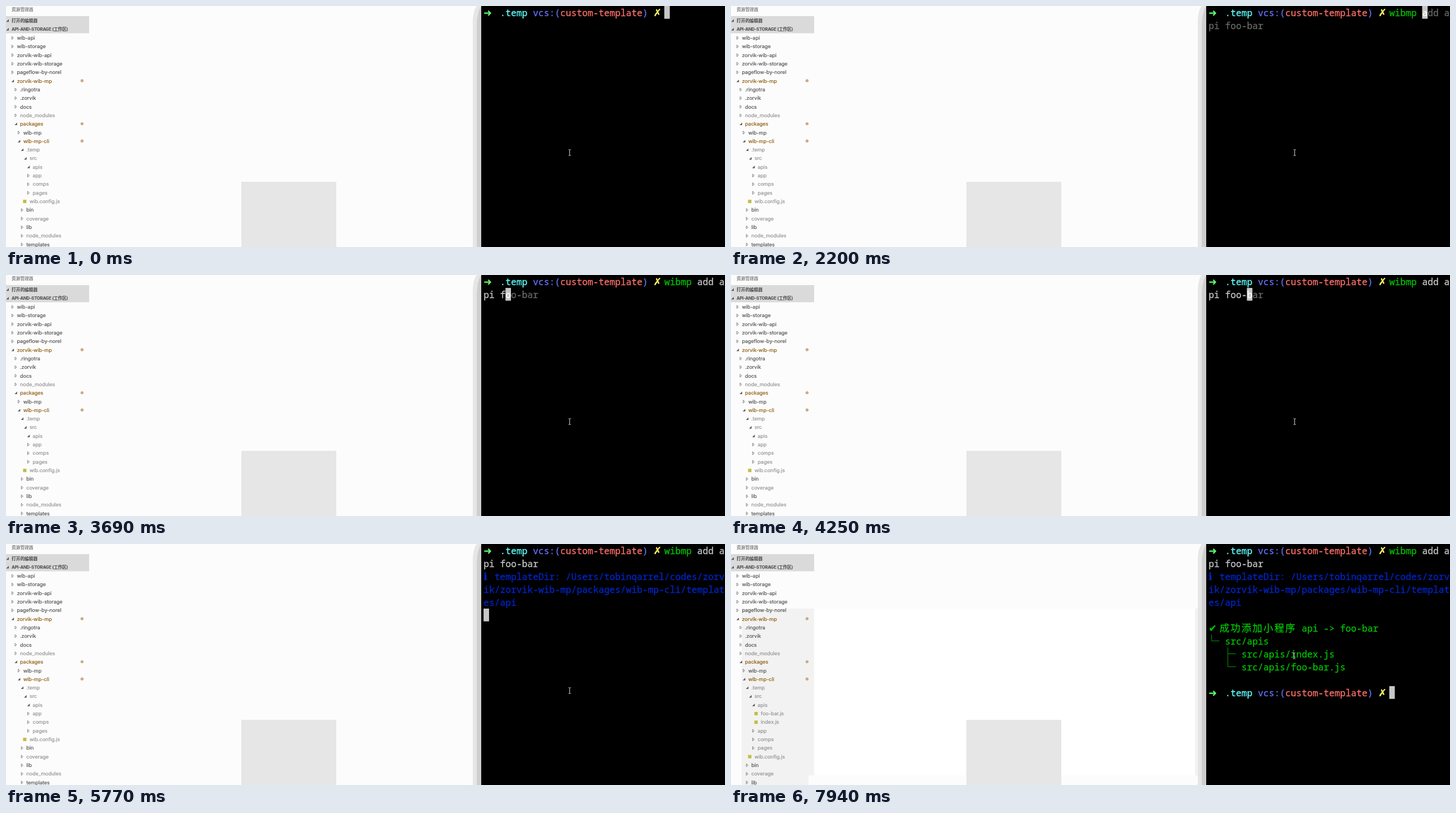
Animation of 1280x429 px, one loop 8000 ms. Source, as an HTML page:

```html
<!DOCTYPE html>
<html lang="zh-CN">
<head>
<meta charset="utf-8">
<title>Terminal demo</title>
<style>
  html, body { margin: 0; width: 100%; height: 100%; overflow: hidden; background: #fcfcfc; }
  svg { display: block; width: 100vw; height: 100vh; }
  text { white-space: pre; fill: currentColor; stroke: currentColor; stroke-width: .15; }
  .side { font: 9px Inter, "Noto Sans CJK SC", "Noto Sans CJK", sans-serif; }
  .head { font: 7.7px Inter, "Noto Sans CJK SC", "Noto Sans CJK", sans-serif; }
  .bold { font-weight: 700; }
  .tight { letter-spacing: -.2px; }
  .mono { font: 16.25px "Noto Sans Mono", monospace; }
  .mono text { stroke-width: .3; }
  .sym { font: 17.5px "DejaVu Sans", sans-serif; }
  .cjk { font: 17.5px "Noto Sans CJK SC", "Noto Sans CJK", sans-serif; letter-spacing: 2px; }
</style>
</head>
<body>
<svg viewBox="0 0 1280 429" preserveAspectRatio="none">
  <rect width="1280" height="429" fill="#fcfcfc"/>
  <g id="panes"></g>
  <rect x="419" y="313" width="169" height="169" fill="#e6e6e6"/>
  <path d="M838 0Q832 8 831 25V429H846V0Z" fill="#e6e6e6"/>
  <path d="M846 0Q839 11 838 32V429H846Z" fill="#cfcfcf"/>
  <rect y="18" width="148" height="30.5" fill="#dadada"/>
  <g class="head">
    <text x="10" y="9.4" color="#6c6c6c">资源管理器</text>
    <g class="bold" color="#555">
      <text x="10" y="28.8">打开的编辑器</text>
      <text x="10" y="44" class="tight">API-AND-STORAGE (工作区)</text>
    </g>
    <path d="M5 23.6v4.6h-4.6zM5 38.9v4.6h-4.6z" fill="#555"/>
  </g>
  <g id="tree" class="side"></g>
  <rect x="846" width="434" height="429" fill="#000"/>
  <g id="term" class="mono"></g>
  <path id="beam" d="M-2 -5.5Q0 -5.5 0 -4Q0 -5.5 2 -5.5M0 -4V4M-2 5.5Q0 5.5 0 4Q0 5.5 2 5.5"
        fill="none" stroke="#d0d0d0" stroke-width="1"/>
</svg>
<script>
const LOOP = 8000, X0 = 850.2, CELL = 9.75, LINE = 23, COLS = 44;
const C = {
  fg: '#c7c7c7', dim: '#686868', green: '#00c200', lime: '#5ffa68', cyan: '#60fdff',
  blue: '#6871ff', navy: '#0225c7', red: '#ff6e67', yellow: '#fffc67',
  item: '#4c4c4c', ignored: '#8e8e90', edited: '#895503'
};
const CMD = 'wibmp add api foo-bar', START = 33;

// [time, characters typed]
const KEYS = [[500, 1], [680, 3], [1870, 4], [1990, 5], [2200, 6], [2380, 7], [2560, 8],
  [2680, 9], [2860, 10], [2980, 12], [3150, 13], [3240, 14], [3690, 15], [3790, 16],
  [3890, 17], [4250, 18], [4700, 20], [4910, 21]];
const ENTER = 5410, INFO = 5770, DONE = 5860, FILES = 6460, MOVE = 6940;

const $ = id => document.getElementById(id);
const esc = s => s.replace(/&/g, '&amp;').replace(/</g, '&lt;').replace(/>/g, '&gt;');
const label = (x, y, s, color, cls = '') =>
  `<text x="${x.toFixed(2)}" y="${y.toFixed(2)}" color="${color}" class="${cls}">${esc(s)}</text>`;
const box = (x, y, w, h, fill) =>
  `<rect x="${x}" y="${y}" width="${w}" height="${h}" fill="${fill}"/>`;

// Text on the terminal grid, wrapped at the last column
function put(row, col, s, color, cls) {
  let out = '';
  while (s) {
    row += Math.floor(col / COLS);
    col %= COLS;
    const part = s.slice(0, COLS - col);
    out += label(X0 + col * CELL, row * LINE + 18, part, color, cls);
    s = s.slice(part.length);
    col += part.length;
  }
  return out;
}

function cursor(row, col, under = '') {
  row += Math.floor(col / COLS);
  col %= COLS;
  return box(X0 + col * CELL, row * LINE, CELL, 22.7, C.fg) + put(row, col, under, '#fff');
}

const prompt = row =>
  put(row, 0, '➜', C.lime, 'sym bold') + put(row, 3, '.temp', C.cyan) +
  put(row, 9, 'vcs:(', C.blue) + put(row, 14, 'custom-template', C.red) +
  put(row, 29, ')', C.blue) + put(row, 31, '✗', C.yellow, 'sym bold');

function command(n) {
  const color = n < 2 ? C.fg : n < 5 ? C.red : C.green;
  const name = Math.min(n, 5);
  return put(0, START, CMD.slice(0, name), color) +
    put(0, START + name, CMD.slice(name, n), C.fg) +
    (n ? put(0, START + n, CMD.slice(n), C.dim) : '');
}

const info = () =>
  put(2, 0, 'ℹ', C.navy, 'sym') +
  put(2, 2, 'templateDir: /Users/tobinqarrel/codes/zorvik/zorvik-wib-mp/packages/wib-mp-cli/templates/api', C.navy);

const result = () =>
  put(6, 0, '✔', C.green, 'sym') + put(6, 2, '成功添加小程序', C.green, 'cjk') +
  put(6, 17, 'api -> foo-bar', C.green) + put(7, 3, 'src/apis', C.green) +
  put(8, 6, 'src/apis/index.js', C.green) + put(9, 6, 'src/apis/foo-bar.js', C.green) +
  '<path d="M855.5 161V172.5H869.5M884.5 184V218.5H899M884.5 195.5H899" fill="none" stroke="#009a00"/>';

function drawTerm(t) {
  const n = KEYS.reduce((k, [at, count]) => t >= at ? count : k, 0);
  const out = prompt(0) + command(n);
  if (t < ENTER) return out + cursor(0, START + n, n ? CMD.charAt(n) : '');
  if (t < INFO) return out + cursor(2, 0);
  if (t < DONE) return out + info() + cursor(5, 0);
  return out + info() + result() + prompt(11) + cursor(11, START);
}

// Each item: level, mark (> closed, v open, * file), name, state (- ignored, + edited)
const ITEMS = `0>wib-api 0>wib-storage 0>zorvik-wib-api 0>zorvik-wib-storage 0>pageflow-by-norel
0vzorvik-wib-mp+ 1>.ringotra 1>.zorvik 1>docs 1>node_modules- 1vpackages+ 2>wib-mp 2vwib-mp-cli+
3v.temp- 4vsrc- 5vapis- 6*foo-bar.js- 6*index.js- 5>app- 5>comps- 5>pages- 4*wib.config.js-
3>bin 3>coverage- 3>lib 3>node_modules- 3>templates`.split(/\s+/);

function drawItem(item, i) {
  const [, level, mark, name, state] = item.match(/^(\d)(.)(.*?)([-+]?)$/);
  const x = 19.4 + level * 5.62, y = 56.8 + i * 15.32;
  const color = state === '+' ? C.edited : state === '-' ? C.ignored : C.item;
  const icon = {
    '>': `<path d="M${x - 9} ${y - 2.7}l3 2.7l-3 2.7z" fill="none" stroke="#777" stroke-width=".9"/>`,
    'v': `<path d="M${x - 5.2} ${y - 2.5}v4.6h-4.6z" fill="#5a5a5a"/>`,
    '*': box(x - 11.5, y - 3, 6, 6, '#c0bf45')
  }[mark];
  const dot = state === '+' ? `<circle cx="135.4" cy="${y - .4}" r="2.7" fill="#c8ab8b"/>` : '';
  return icon + label(x, y + 3.2, name, color) + dot;
}

const drawTree = t =>
  ITEMS.filter(s => t >= FILES || s[0] !== '6').map(drawItem).join('');

function drawPanes(t) {
  if (t < FILES) return '';
  const shade = box(19, 115, 119, 314, '#f2f2f2');
  return t < MOVE ? shade
    : shade + box(138, 115, 10, 297, '#f2f2f2') + box(148, 115, 678, 297, '#fff') +
      box(826, 115, 5, 297, '#f3f3f3');
}

// Pointer travels in even steps along two straight legs
function pointer(t) {
  const legs = [[MOVE, 7620, 7, 944, 224], [7770, 7940, 3, 1002.5, 199]];
  let x = 1003.5, y = 261;
  for (const [from, to, steps, tx, ty] of legs) {
    if (t < from) break;
    const k = Math.min(steps, 1 + Math.floor((t - from) / (to - from) * (steps - 1))) / steps;
    x += (tx - x) * k;
    y += (ty - y) * k;
  }
  return [x, y];
}

const CUTS = [...KEYS.map(k => k[0]), ENTER, INFO, DONE, FILES, MOVE];
let shown = -1;

function render(t) {
  const phase = CUTS.filter(cut => t >= cut).length;
  if (phase !== shown) {
    shown = phase;
    $('panes').innerHTML = drawPanes(t);
    $('tree').innerHTML = drawTree(t);
    $('term').innerHTML = drawTerm(t);
  }
  $('beam').setAttribute('transform', `translate(${pointer(t).join(' ')})`);
}

const begin = performance.now();
function tick() {
  render((performance.now() - begin) % LOOP);
  requestAnimationFrame(tick);
}
tick();
</script>
</body>
</html>
```
